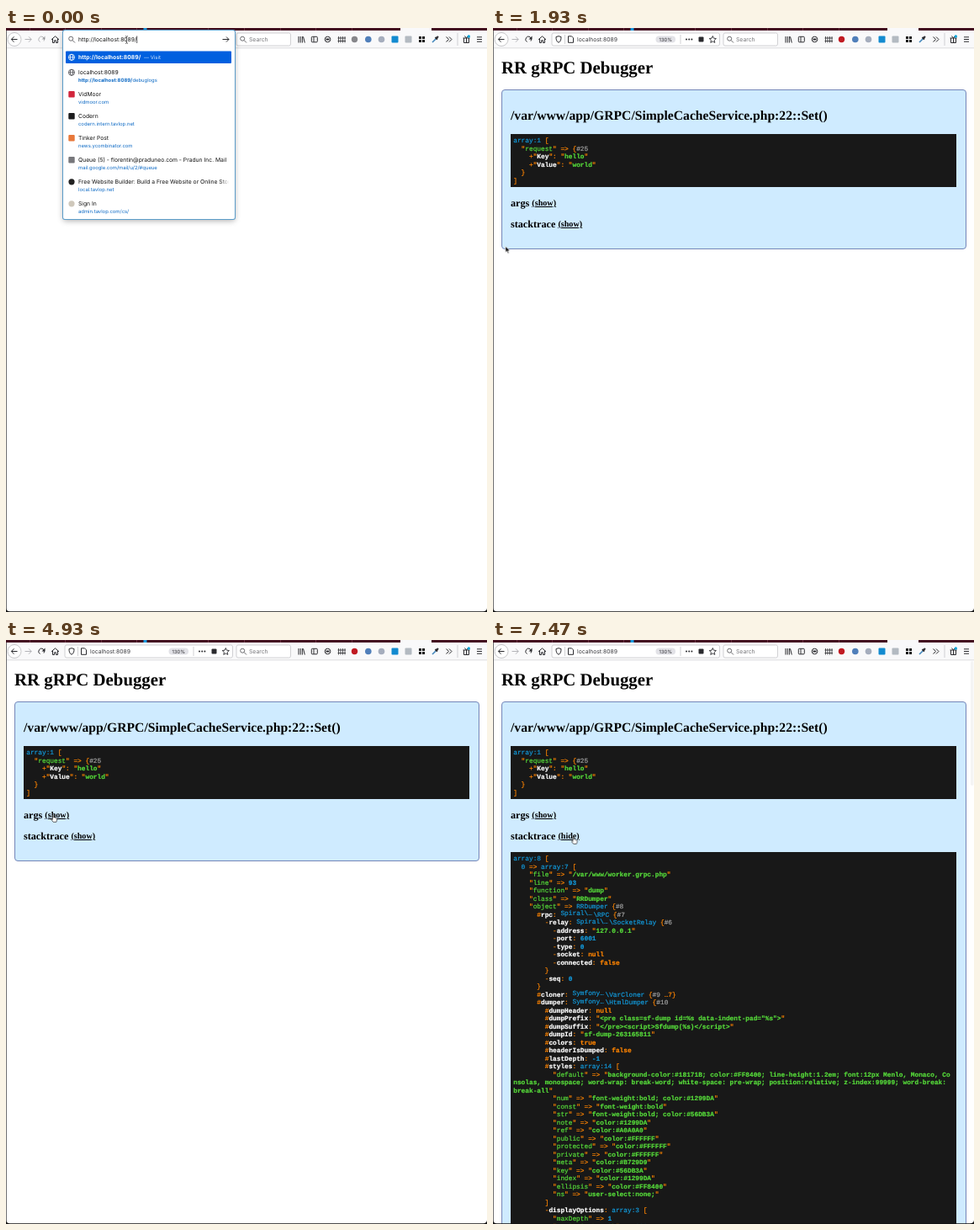
These frames come from a looping animation (572x694 px, 8 s). An HTML page:

```html
<!DOCTYPE html>
<html lang="en">
<head>
<meta charset="utf-8">
<title>gRPC debugger</title>
<style>
html, body { margin: 0; width: 100%; height: 100%; overflow: hidden; background: #fff; }
body { text-rendering: geometricPrecision; }
#stage { position: absolute; left: 0; top: 0; width: 572px; height: 694px; overflow: hidden; background: #fff; }
#stage > *, #card > * { position: absolute; left: 0; top: 0; }
svg { display: block; font-family: Inter, "Open Sans", sans-serif; }

/* page */
.line { font: bold 12.17px/20px "Liberation Serif", serif; color: #000; white-space: pre; margin: 0; }
#stage > h1.line { font-size: 20.8px; left: 10px; top: 37.5px; }
#card { left: 0; top: 0; width: 572px; height: 694px; }
#card > .line { left: 21px; }
#card > h2.line { font-size: 15.65px; top: 94.5px; }
.link { position: absolute; margin-top: 1px; font-size: 10.14px; text-decoration: underline; }
#card > .panel { left: 10px; top: 73px; width: 553px; height: 190px; box-sizing: border-box;
  border: 1px solid #7486b8; border-radius: 4px; background: #cfebff; }
#card > pre { left: 21px; width: 530px; box-sizing: border-box; padding: 5px 3px 1px 3.25px; margin: 0; background: #181818;
  color: #ff8400; font: 7.8px/9.5px "Liberation Mono", monospace; white-space: pre; overflow: hidden;
  -webkit-text-stroke: .2px; }
pre i { font-style: normal; }
pre .note { color: #1299da; }
pre .far { color: #1299da; display: inline-block; width: 39px; position: relative; top: -1.3px; }
pre .key { color: #56db3a; }
pre .str { color: #56db3a; font-weight: bold; }
pre .num { color: #1299da; font-weight: bold; }
pre .word { font-weight: bold; }
pre .prop { color: #fff; font-weight: bold; }
pre .ref { color: #a0a0a0; }

/* browser */
.ink { fill: none; stroke: #2a2a2e; stroke-width: 1; }
#popup { left: 68px; top: 3px; width: 204px; height: 224px; overflow: hidden; background: #fff; border-radius: 2px;
  box-shadow: 0 0 0 1px #5b9cc9, 0 2px 7px #0005; }

/* timeline */
.t { animation: 8s step-end infinite; }
#beam { animation-name: beam; }
.old { animation-name: old; }
.new { animation-name: new; }
#popup { animation: popup 8s step-end infinite; }
#ring { animation-name: ring; }
#head { animation-name: head; }
#shield { animation-name: shield; }
#title { animation-name: title; }
#status { animation-name: status; }
#card { animation: card 8s step-end infinite; }
.panel { animation-name: panel; }
.argsOn { animation-name: argsOn; }
.argsOff { animation-name: argsOff; }
.traceOn { animation-name: traceOn; }
.traceOff { animation-name: traceOff; }
#trace { animation-name: slide; }
#bar { animation-name: bar; }
#arrow { animation: arrow 8s linear infinite; }
#hand { animation: hand 8s ease-in-out infinite; }
@keyframes beam { 0% { opacity: 1 } .875%, 100% { opacity: 0 } }
@keyframes old { 0% { opacity: 1 } 1.625%, 100% { opacity: 0 } }
@keyframes new { 0% { opacity: 0 } 1.625%, 100% { opacity: 1 } }
@keyframes popup { 0% { height: 224px; opacity: 1 } 3.375% { height: 119px; opacity: 1 } 8.375%, 100% { height: 119px; opacity: 0 } }
@keyframes ring { 0% { stroke: #b4b4b8 } 8.375%, 100% { stroke: #2a2a2e } }
@keyframes head { 0% { opacity: .35 } 8.375% { opacity: 0 } 13.375%, 100% { opacity: 1 } }
@keyframes shield { 0% { fill: #86868a } 8.375%, 100% { fill: #c01a22 } }
@keyframes title { 0% { opacity: 0 } 9.125%, 100% { opacity: 1 } }
@keyframes status { 0%, 11.625%, 100% { opacity: 0 } 8.375% { opacity: 1 } }
@keyframes card { 0% { opacity: 0 } 11.625%, 100% { opacity: 1 } }
@keyframes panel { 0%, 61.625% { height: 190px } 41.625% { height: 561px } 77.5%, 100% { height: 640px } }
@keyframes argsOn { 0%, 61.625%, 100% { opacity: 0 } 41.625% { opacity: 1 } }
@keyframes argsOff { 0%, 61.625%, 100% { opacity: 1 } 41.625% { opacity: 0 } }
@keyframes traceOn { 0% { opacity: 0 } 77.5%, 100% { opacity: 1 } }
@keyframes traceOff { 0% { opacity: 1 } 77.5%, 100% { opacity: 0 } }
@keyframes slide { 0%, 61.625%, 100% { transform: none } 41.625% { transform: translateY(371px) } }
@keyframes bar { 0% { opacity: 0 } 77.5% { opacity: 1 } 91.625% { opacity: .6 } 92.5% { opacity: .3 } 93.375%, 100% { opacity: .08 } }
@keyframes arrow {
  0%, 20.87% { opacity: 0; transform: translate(551px, 0) }
  20.875% { opacity: 1; transform: translate(551px, 0); animation-timing-function: ease-out }
  24.1% { transform: translate(14px, 259px) }
  30%, 32.49% { opacity: 1; transform: translate(52px, 201px) }
  32.5%, 100% { opacity: 0; transform: translate(52px, 201px) }
}
@keyframes hand {
  0%, 32.49% { opacity: 0; transform: translate(53px, 207px) }
  32.5%, 65% { opacity: 1; transform: translate(53px, 207px) }
  73.375%, 83.3% { transform: translate(91px, 230.5px) }
  85%, 100% { opacity: 1; transform: translate(92.5px, 233px) }
}
</style>
</head>
<body>
<div id="stage">
  <h1 class="line t" id="title">RR gRPC Debugger</h1>

  <div id="card">
    <div class="panel t"></div>
    <h2 class="line">/var/www/app/GRPC/SimpleCacheService.php:22::Set()</h2>
    <pre id="request" style="top:126px"></pre>
    <h3 class="line" style="top:198px">args <span class="link t argsOff">(show)</span><span class="link t argsOn">(hide)</span></h3>
    <pre id="args" class="t argsOn" style="top:227px"></pre>
    <h3 class="line t" id="trace" style="top:223px">stacktrace <span class="link t traceOff">(show)</span><span class="link t traceOn">(hide)</span></h3>
    <pre id="stack" class="t traceOn" style="top:252px"></pre>
  </div>

  <svg width="572" height="694" viewBox="0 0 572 694">
    <defs>
      <g id="globe" fill="none" stroke="#4a4a4f" stroke-width=".8">
        <circle r="3.6"/><ellipse rx="1.7" ry="3.6"/><path d="M-3.6 0H3.6"/>
      </g>
      <g id="lens" class="ink" style="stroke:#6a6a6e"><circle r="2.5" cx="-.8" cy="-.8"/><path d="M1 1L4 4"/></g>
    </defs>
    <path fill="#f9f9fa" d="M0 3H572V24H0z"/>
    <path fill="#d2d2d6" d="M0 23.5H572V24.3H0z"/>
    <path fill="#430f20" d="M0 0H572V3H0z"/>
    <path fill="#6b3344" d="M28 0h1v3h-1zM70 0h1v3h-1zM113 0h1v3h-1zM155 0h1v3h-1zM240 0h1v3h-1zM283 0h1v3h-1zM326 0h1v3h-1zM368 0h1v3h-1zM411 0h1v3h-1z"/>
    <path fill="#1b9be0" d="M163.5 0h4v3h-4z"/>
    <path fill="#f9f9fa" d="M469 0h37v4h-37z"/>

    <circle cx="10" cy="13.5" r="8" fill="#fff" stroke="#b9b9bd" stroke-width=".8"/>
    <path class="ink" d="M13.5 13.5H6.5M9.5 10.3L6.3 13.5 9.5 16.7"/>
    <path class="ink" style="stroke:#b4b4b8" d="M22.5 13.5H30M27 10.3L30.2 13.5 27 16.7"/>
    <path id="ring" class="ink t" d="M40.5 16.5A3.4 3.4 0 1 1 45 15.5"/>
    <path id="head" class="t" fill="#2a2a2e" d="M46.5 9.5V13.5H42.5z"/>
    <path class="ink" d="M54 13.8L58.5 9.8 63 13.8M55.5 13V17.5H57.5V14.8H59.5V17.5H61.5V13"/>

    <g fill="#fff" stroke="#c6c6ca" stroke-width=".8">
      <rect x="70" y="6" width="199.5" height="15" rx="2"/>
      <rect x="274" y="6" width="64.5" height="15" rx="2"/>
      <path d="M85.5 8V19M223 8V19M537 6V21"/>
    </g>
    <path class="ink" d="M75 10.5L78 9.7 81 10.5C81 14 80.5 16 78 17.3 75.5 16 75 14 75 10.5z"/>
    <path class="ink" d="M89.5 9.8H93.5L95.5 11.8V17.3H89.5z"/>
    <text x="100" y="16.2" font-size="6.8" fill="#38383d">localhost:8089</text>
    <rect x="193.5" y="9.5" width="23.5" height="8" rx="4" fill="#e2e2e7"/>
    <text x="205.2" y="15.7" font-size="5.8" text-anchor="middle" fill="#2a2a2e">130%</text>
    <g fill="#2a2a2e"><circle cx="230" cy="13.5" r="1"/><circle cx="233.2" cy="13.5" r="1"/><circle cx="236.4" cy="13.5" r="1"/>
      <rect x="244.5" y="10.5" width="6" height="6" rx="1"/></g>
    <path class="ink" style="stroke-width:.9" d="M261.3 9.5L262.5 12.2 265.4 12.5 263.2 14.5 263.8 17.4 261.3 15.9 258.8 17.4 259.4 14.5 257.2 12.5 260.1 12.2z"/>
    <use href="#lens" x="282" y="13.5"/>
    <text x="289" y="16.1" font-size="6.8" fill="#757579">Search</text>

    <path class="ink" d="M348 10V17.5M350.2 10V17.5M352.4 10V17.5M353.5 10.3L355.3 17.5"/>
    <rect class="ink" x="363.3" y="10.3" width="7" height="6.5" rx="1"/><path class="ink" d="M366 10.5V16.5"/>
    <circle class="ink" cx="382.5" cy="13.5" r="3.3"/><path fill="#2a2a2e" d="M380.5 12.5h4v2h-4z"/>
    <path class="ink" d="M395.5 10V17.5M398 10V17.5M400.5 10V17.5M403 10V17.5M394.5 12H404M394.5 15.5H404" style="stroke-width:.8"/>
    <circle id="shield" class="t" cx="414.5" cy="13.5" r="3.7" fill="#c01a22"/>
    <circle cx="430.8" cy="13.5" r="3.8" fill="#507fba"/>
    <circle cx="446.5" cy="13.5" r="3.8" fill="#a5adbd"/>
    <rect x="458.5" y="9.5" width="8" height="8" rx="1" fill="#138bd0"/>
    <rect x="474.5" y="9.5" width="8" height="8" rx="1" fill="#b3bac1"/>
    <path fill="#111" d="M491 10h3v3h-3zM495 10h3v3h-3zM491 14h3v3h-3zM495 14h3v3h-3z"/>
    <path class="ink" d="M507 17L511.5 12.5" style="stroke:#4689bd;stroke-width:1.6"/><path class="ink" d="M510.5 11L513 13.5M512 12L514 10" style="stroke-width:2"/>
    <path class="ink" d="M523.5 10.5L526.5 13.5 523.5 16.5M527 10.5L530 13.5 527 16.5"/>
    <path class="ink" d="M543.5 12H551.5M544.5 12V17.5H550.5V12M547.5 12V17.5M545.5 9.5L547.5 12 549 10"/><circle cx="550.3" cy="10" r="1.7" fill="#0aa3d8"/>
    <path class="ink" d="M560 10.8H566M560 13.5H566M560 16.2H566"/>

    <g id="status" class="t">
      <path fill="#f9f9fa" stroke="#cfcfd3" stroke-width=".8" d="M0 685.5H119.5Q121 685.5 121 687V694H0z"/>
      <text x="2" y="691.8" font-size="5.8" fill="#222">localhost</text>
    </g>
    <rect id="bar" class="t" x="568" y="25" width="3.5" height="148" rx="1.7" fill="#7c7c7e"/>
    <path fill="#4d4d50" d="M0 3H.8V694H0z"/>
    <path fill="#111" d="M0 689.5Q.5 693.3 4.5 693.3H567.5Q571.5 693.3 572 689.5V694H0z"/>
  </svg>

  <div id="popup"><svg width="204" height="224" viewBox="68 3 204 224">
    <defs><linearGradient id="fade"><stop stop-color="#fff" stop-opacity="0"/><stop offset=".6" stop-color="#fff"/></linearGradient></defs>
    <use href="#lens" x="78" y="13.5"/>
    <text x="86" y="16.2" font-size="6.75" fill="#111">http://localhost:8089/</text>
    <path class="ink" style="stroke-width:.8" d="M155.7 9.5V18"/>
    <path class="ink" d="M257.5 13.5H265M262 10.5L265 13.5 262 16.5"/>
    <path id="beam" class="ink t" style="stroke:#555;stroke-width:.8" d="M142 9.5Q143.5 9.5 143.5 11V17Q143.5 18.5 142 18.5M145 9.5Q143.5 9.5 143.5 11V17Q143.5 18.5 145 18.5"/>
    <rect x="71" y="27.5" width="197" height="14.5" rx="1" fill="#0060df"/>
    <g fill="none" stroke="#fff" stroke-width=".8"><circle cx="78" cy="34.8" r="3.6"/><ellipse cx="78" cy="34.8" rx="1.7" ry="3.6"/><path d="M74.4 34.8H81.6"/></g>
    <text x="86" y="37.2" font-size="6.8" font-weight="700" fill="#fff">http://localhost:8089/</text>
    <text x="164" y="37" font-size="6" fill="#d5e5fb">— Visit</text>
    <g id="rows"></g>
    <rect x="255" y="174" width="17" height="16" fill="url(#fade)"/>
  </svg></div>

  <svg id="arrow" width="8" height="11"><path fill="#111" stroke="#fff" stroke-width=".7" d="M.5.5V8L2.3 6.4 3.6 9.3 4.9 8.7 3.7 6H6z"/></svg>
  <svg id="hand" width="9" height="10"><path fill="#fff" stroke="#222" stroke-width=".7" d="M2.4 5.8V1.2Q3.1.2 3.8 1.2V4Q4.7 3.5 5.2 4.2 6.1 3.8 6.5 4.6 7.6 4.5 7.6 5.6V7.2L6.8 9.3H3.2L.7 6.3Q.8 5.2 2.4 6.5z"/></svg>
</div>

<script>
const $ = id => document.getElementById(id);

// Address bar suggestions: row, title, address, icon, class
const box = c => `<rect x="-3.7" y="-3.7" width="7.4" height="7.4" rx="1" fill="${c}"/>`;
const dot = c => `<circle r="3.6" fill="${c}"/>`;
const globe = '<use href="#globe"/>';
const host = path => `<tspan font-weight="700">http://localhost:8089/</tspan>${path}`;
$('rows').innerHTML = [
  [0, 'localhost:8089', host('debuglogs'), globe, ''],
  [1, 'VidMoor', 'vidmoor.com', box('#d2263c'), 't old'],
  [2, 'Codern', 'codern.intern.tavlop.net', box('#1c1c1e'), 't old'],
  [1, 'localhost:8089', host(''), globe, 't new'],
  [2, 'localhost:8089', host('logs'), globe, 't new'],
  [3, 'Tinker Post', 'news.ycombinator.com', box('#e8783a'), ''],
  [4, 'Queue (5) - florentin@praduneo.com - Pradun Inc. Mail', 'mail.google.com/mail/u/2/#queue', box('#77777b'), ''],
  [5, 'Free Website Builder: Build a Free Website or Online Store', 'local.tavlop.net', dot('#222'), ''],
  [6, 'Sign In', 'admin.tavlop.com/cs/', dot('#cfc8bb'), '']
].map(([row, title, url, icon, cls]) => `<g class="${cls}">
  <g transform="translate(78 ${52.8 + row * 26})">${icon}</g>
  <text x="86" y="${55 + row * 26}" font-size="6.75" fill="#111">${title}</text>
  <text x="86" y="${63.5 + row * 26}" font-size="5.9" fill="#0a68c4">${url}</text></g>`).join('');

// Dump colouring: ~...~ is a shortened namespace, ^ continues a wrapped string
const token = /~(.+?)~|"([^"]*)"(?= =>)|"(\w+)"(?=:)|"(.*?)("?)$|\^(.*?)("?)$|([-+#])(\w+)(?=:)|(array:\d+|\\?\w+(?= \{)|\d+(?= =>))|(#\d+)|(-?\d+)$|(null|true|false)$/g;
const tag = (cls, s) => `<i class="${cls}">${s.replace(/</g, '&lt;')}</i>`;
const paint = line => line.replace(token, (m, far, key, pub, str, end, run, runEnd, sign, prop, note, ref, num, word) =>
  far ? tag('far', far) :
  key ? `"${tag('key', key)}"` :
  pub ? `"${tag('prop', pub)}"` :
  str ? `"${tag('str', str)}${end}` :
  run ? tag('str', run) + runEnd :
  prop ? sign + tag('prop', prop) :
  note ? tag('note', note) :
  ref ? tag('ref', ref) :
  num ? tag('num', num) : tag('word', word));
const dump = (id, text) => $(id).innerHTML = text.trim().split('\n').map(paint).join('\n');

dump('request', `
array:1 [
  "request" => {#25
    +"Key": "hello"
    +"Value": "world"
  }
]`);

const headers = [
  [':authority', 'simplecache:9090'],
  [':peer.address', '172.29.0.3:60156'],
  ['content-type', 'application/grpc'],
  ['grpcgateway-accept', '*/*'],
  ['grpcgateway-content-type', 'application/x-www-form-urlencoded'],
  ['grpcgateway-user-agent', 'vscode-restclient'],
  ['user-agent', 'grpc-go/1.34.0'],
  ['x-forwarded-for', '172.29.0.1'],
  ['x-forwarded-host', 'localhost:8080']
].map(([k, v]) => `      "${k}" => array:1 [\n        0 => "${v}"\n      ]`).join('\n');

dump('args', String.raw`
array:2 [
  0 => ~Spiral\…~\Context {#16
    -values: array:10 [
${headers}
      "Spiral\GRPC\ResponseHeaders" => ~Spiral\…~\ResponseHeaders {#18
        -headers: []
      }
    ]
  }
  1 => ~Morvel\…~\SetRequest {#17}
]`);

const styles = [
  ['num', 'font-weight:bold; color:#1299DA'], ['const', 'font-weight:bold'],
  ['str', 'font-weight:bold; color:#56DB3A'], ['note', 'color:#1299DA'], ['ref', 'color:#A0A0A0'],
  ['public', 'color:#FFFFFF'], ['protected', 'color:#FFFFFF'], ['private', 'color:#FFFFFF'],
  ['meta', 'color:#B729D9'], ['key', 'color:#56DB3A'], ['index', 'color:#1299DA'],
  ['ellipsis', 'color:#FF8400'], ['ns', 'user-select:none;']
].map(([k, v]) => `          "${k}" => "${v}"`).join('\n');

dump('stack', String.raw`
array:8 [
  0 => array:7 [
    "file" => "/var/www/worker.grpc.php"
    "line" => 93
    "function" => "dump"
    "class" => "RRDumper"
    "object" => RRDumper {#8
      #rpc: ~Spiral\…~\RPC {#7
        -relay: ~Spiral\…~\SocketRelay {#6
          -address: "127.0.0.1"
          -port: 6001
          -type: 0
          -socket: null
          -connected: false
        }
        -seq: 0
      }
      #cloner: ~Symfony…~\VarCloner {#9 …7}
      #dumper: ~Symfony…~\HtmlDumper {#10
        #dumpHeader: null
        #dumpPrefix: "<pre class=sf-dump id=%s data-indent-pad="%s">"
        #dumpSuffix: "</pre><script>Sfdump(%s)<\/script>"
        #dumpId: "sf-dump-263165811"
        #colors: true
        #headerIsDumped: false
        #lastDepth: -1
        #styles: array:14 [
          "default" => "background-color:#18171B; color:#FF8400; line-height:1.2em; font:12px Menlo, Monaco, Co
^nsolas, monospace; word-wrap: break-word; white-space: pre-wrap; position:relative; z-index:99999; word-break: 
^break-all"
${styles}
        ]
        -displayOptions: array:3 [
          "maxDepth" => 1
          "maxStringLength" => 160`.replace('<\\/', '</'));
</script>
</body>
</html>
```
